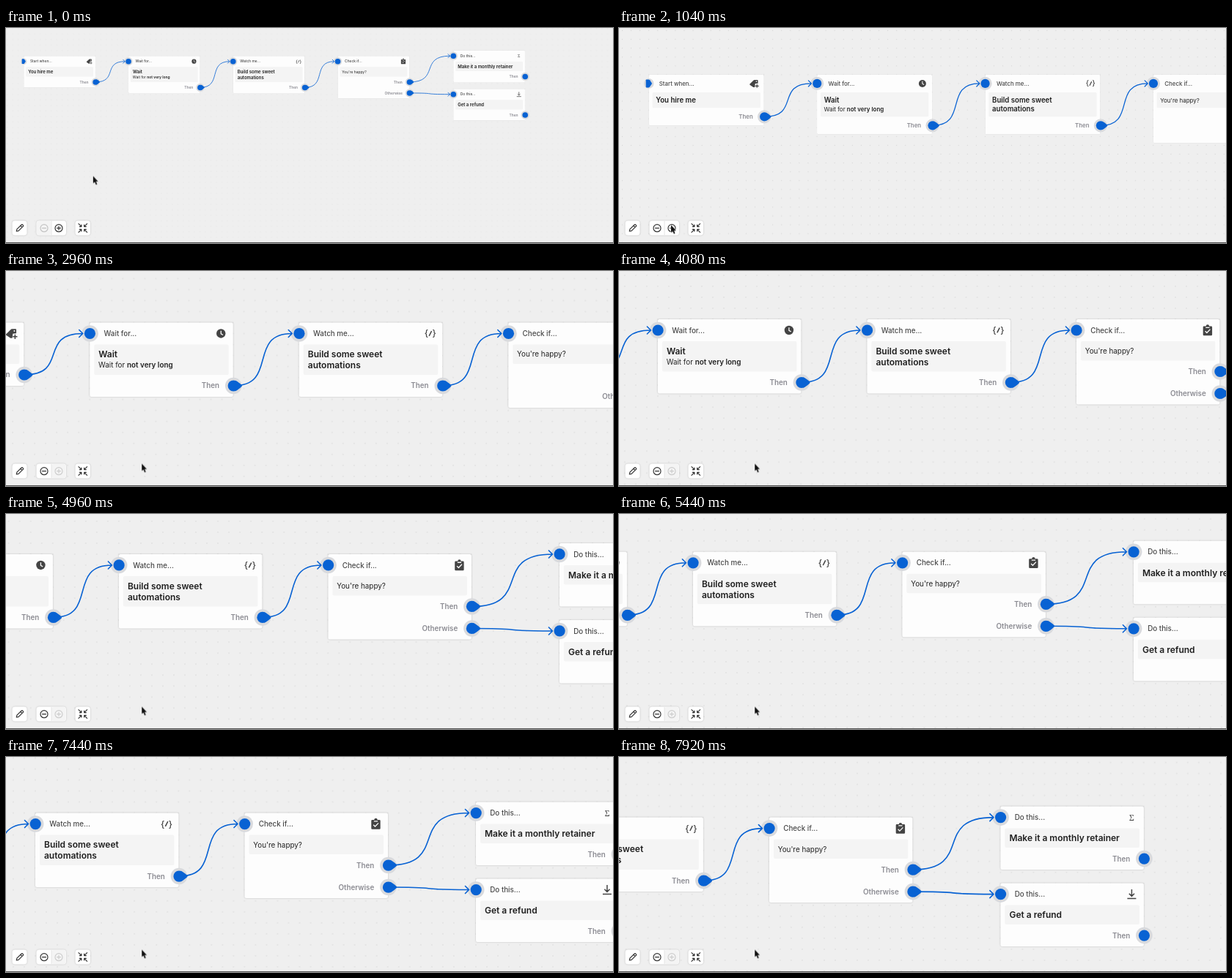
These frames come from a looping animation (828x294 px, 8000 ms). An HTML page:

```html
<!DOCTYPE html>
<html lang="en">
<head>
<meta charset="utf-8">
<title>Automation flow</title>
<style>
  html, body { margin: 0; width: 100%; height: 100%; overflow: hidden; background: #efefef; }
  svg { display: block; width: 828px; height: 294px; font-family: Inter, sans-serif; }

  /* 1% = 80 ms */
  #world { animation: view 8s infinite; }
  #cursor { animation: point 8s infinite; }
  #minus { animation: minus 8s step-end infinite; }
  #plus { animation: plus 8s step-end infinite; }
  #shade { animation: shade 8s step-end infinite; }

  @keyframes view {
    0%, 9% { transform: translate(24.2px, 38.2px) scale(.5); animation-timing-function: cubic-bezier(.35, .1, .4, 1); }
    18%, 25.5% { transform: translate(51.4px, 80.5px) scale(1); }
    26% { transform: translate(51.4px, 80.5px) scale(1); animation-timing-function: cubic-bezier(.33, .3, .67, .78); }
    37% { transform: translate(-171.1px, 70.5px) scale(1); animation-timing-function: cubic-bezier(.33, .67, .67, 1); }
    47.5%, 54% { transform: translate(-232.6px, 66px) scale(1); animation-timing-function: cubic-bezier(.3, .1, .4, .95); }
    68% { transform: translate(-470.1px, 51.8px) scale(1); animation-timing-function: cubic-bezier(.3, 0, .4, 1); }
    76%, 92% { transform: translate(-516.1px, 75.8px) scale(1); animation-timing-function: cubic-bezier(.3, .1, .5, 1); }
    99%, 100% { transform: translate(-651.6px, 82.6px) scale(1); }
  }
  @keyframes point {
    0% { transform: translate(118.8px, 202.4px); animation-timing-function: ease-in-out; }
    8%, 14% { transform: translate(71px, 269.5px); animation-timing-function: ease-in-out; }
    20%, 100% { transform: translate(185.2px, 263.4px); }
  }
  @keyframes minus { 0% { opacity: .25; } 8%, 100% { opacity: 1; } }
  @keyframes plus { 0% { opacity: 1; } 16%, 100% { opacity: .2; } }
  @keyframes shade { 0% { transform: translate(42px, 264px); } 8% { transform: translate(42px, 264px); opacity: 0; } 16%, 100% { transform: translate(62px, 264px); opacity: 1; } }

  .card { fill: #fdfdfd; filter: drop-shadow(0 .8px .8px rgba(0, 0, 0, .2)); }
  .body { fill: #f4f4f4; }
  .head { font-size: 9.8px; font-weight: 500; fill: #484848; }
  .title { font-size: 12px; font-weight: 600; fill: #1f1f1f; }
  .note { font-size: 9.9px; fill: #222; }
  .note tspan { font-weight: 600; }
  .out { font-size: 9.8px; font-weight: 600; fill: #8b8b92; text-anchor: end; }
  .glyph { text-anchor: middle; fill: #444; }
  .ring { fill: #d9dadd; }
  .blue { fill: #0862d3; }
  .edge { fill: none; stroke: #0862d3; stroke-width: 1.6; stroke-linecap: round; stroke-linejoin: round; }
  .dark { fill: #444; }
  .cut { fill: none; stroke: #fdfdfd; stroke-width: 1.3; }
  .line { fill: none; stroke: #444; stroke-width: 1.5; }
  .btn { fill: #fff; filter: drop-shadow(0 .5px 1px rgba(0, 0, 0, .2)); }
  .tool { fill: none; stroke: #333; stroke-width: 1.2; stroke-linecap: round; stroke-linejoin: round; }
</style>
</head>
<body>
<svg viewBox="0 0 828 294">
  <defs>
    <pattern id="dots" x="-7.51" y="-7.51" width="15.025" height="15.025" patternUnits="userSpaceOnUse">
      <circle cx="7.51" cy="7.51" r=".75" fill="#d6d6d6"/>
    </pattern>
  </defs>
  <rect width="828" height="294" fill="#efefef"/>
  <g id="world"></g>

  <g>
    <rect class="btn" x="8.5" y="263.5" width="20" height="20" rx="4"/>
    <path class="tool" d="M14.3 278l.6-2.8 6.2-6.2a1.1 1.1 0 0 1 1.6 0l.6.6a1.1 1.1 0 0 1 0 1.6l-6.2 6.2zM19.8 270.3l2.2 2.2"/>
    <rect class="btn" x="41.5" y="263.5" width="40.5" height="20" rx="4"/>
    <rect id="shade" width="19.5" height="19" rx="3" fill="#f4f4f4"/>
    <path d="M62 264v19" stroke="#e4e4e4"/>
    <g id="minus" class="tool"><circle cx="52" cy="273.7" r="5"/><path d="M49.6 273.7h4.8"/></g>
    <g id="plus" class="tool"><circle cx="72" cy="273.7" r="5"/><path d="M69.6 273.7h4.8M72 271.3v4.8"/></g>
    <rect class="btn" x="94.5" y="263.5" width="20.5" height="20" rx="4"/>
    <g id="fit" class="tool" transform="translate(104.8 273.5)"></g>
  </g>
  <rect y="293" width="828" height="1" fill="#555"/>
  <path id="cursor" d="M0 0v10l2.2-2 1.7 3.9 1.7-.7-1.7-3.8h3z" fill="#111" stroke="#fff" stroke-width=".9" paint-order="stroke"/>
</svg>

<script>
const W = 195.5, PORT_X = 196, IN_Y = 15;

const icons = {
  tag: `<path class="dark" d="M-7.5 .8L-1.2-5.6Q-.6-6.2 .2-6.2H5.3Q6.3-6.2 6.3-5.2V-.3L1.6 .2 .8 6.2H-1.6L-7.5 2.2Q-8 1.5-7.5 .8z"/>
    <circle cx="3.6" cy="-3.5" r="1" fill="#fdfdfd"/><path class="line" d="M4.6 1.2v6.2M1.5 4.3h6.2"/>`,
  clock: `<circle class="dark" r="6.2"/><path class="cut" d="M0-3.8V.3L2.8 2"/>`,
  code: `<g class="glyph" font-size="12" font-weight="500"><text x="-5.4" y="4">{</text><text x="5.4" y="4">}</text></g>
    <path class="line" stroke-width="1.2" d="M-1.6 3.4L1.8-3.4"/>`,
  check: `<path class="dark" d="M-5-5.5H-2.2A2.2 2.2 0 0 1 2.2-5.5H5Q6.2-5.5 6.2-4.3V6Q6.2 7.2 5 7.2H-5Q-6.2 7.2-6.2 6V-4.3Q-6.2-5.5-5-5.5z"/>
    <path class="cut" d="M-3.3 1.2L-1 3.5 3.5-1.2M-2.6-3.7H2.6"/>`,
  sum: `<text class="glyph" y="4" font-size="11" font-family="Noto Serif, serif">Σ</text>`,
  load: `<path class="line" d="M0-6.5V2.6M-3.6-.8L0 2.8 3.6-.8M-6 6H6"/>`
};

const cards = [
  { x: 0, y: 0, head: 'Start when...', icon: 'tag', title: ['You hire me'], outs: ['Then'], start: true },
  { x: 285.5, y: 0, head: 'Wait for...', icon: 'clock', title: ['Wait'],
    note: 'Wait for <tspan>not very long</tspan>', outs: ['Then'], tall: true },
  { x: 571, y: 0, head: 'Watch me...', icon: 'code', title: ['Build some sweet', 'automations'], outs: ['Then'], tall: true },
  { x: 856.5, y: 0, head: 'Check if...', icon: 'check', title: [], note: "You're happy?", outs: ['Then', 'Otherwise'] },
  { x: 1172, y: -15, head: 'Do this...', icon: 'sum', title: ['Make it a monthly retainer'], outs: ['Then'], end: true },
  { x: 1172, y: 90, head: 'Do this...', icon: 'load', title: ['Get a refund'], outs: ['Then'], end: true }
];
// from card, output, to card
const links = [[0, 0, 1], [1, 0, 2], [2, 0, 3], [3, 0, 4], [3, 1, 5]];

const outY = (c, i) => (c.tall ? 86.5 : 71.5) + 30 * i;
const text = (cls, x, y, s) => `<text class="${cls}" x="${x}" y="${y}">${s}</text>`;

function port(x, y, shape, ring = 11.3) {
  return `<g transform="translate(${x} ${y})"><circle class="ring" r="${ring}"/>${shape}</g>`;
}
const disc = '<circle class="blue" r="7.6"/>';
const drop = disc + '<path class="blue" d="M2-7.3Q6-6.2 11.5-.8V.8Q6 6.2 2 7.3z"/>';
const flag = '<path class="blue" d="M-4-6.8H-.5Q.8-6.8 1.6-5.8L5-.8Q5.5 0 5 .8L1.6 5.8Q.8 6.8-.5 6.8H-4Q-5 6.8-5 5.8V-5.8Q-5-6.8-4-6.8z"/>';

function drawCard(c) {
  const height = outY(c, c.outs.length - 1) + 15;
  const noteY = 47 + 15 * c.title.length;
  return `<g transform="translate(${c.x} ${c.y})">
    <rect class="card" width="${W}" height="${height}" rx="2.5"/>
    <rect class="body" x="6" y="30" width="183.5" height="${c.tall ? 41.5 : 26.5}" rx="2"/>
    ${c.start ? port(0, IN_Y, flag, 8.5) : port(0.2, IN_Y, disc)}
    ${text('head', c.start ? 17.5 : 19.3, 18.6, c.head)}
    <g transform="translate(179 ${IN_Y})">${icons[c.icon]}</g>
    ${c.title.map((s, i) => text('title', 12, 47.8 + 15 * i, s)).join('')}
    ${c.note ? text('note', 11.8, noteY, c.note) : ''}
    ${c.outs.map((s, i) => text('out', 176.8, outY(c, i) + 3.5, s) + port(PORT_X, outY(c, i), c.end ? disc : drop)).join('')}
  </g>`;
}

function drawLink([from, i, to]) {
  const a = cards[from], b = cards[to];
  const x1 = a.x + PORT_X, y1 = a.y + outY(a, i);
  const x2 = b.x - 9.5, y2 = b.y + IN_Y, k = (x2 - x1) * .77;
  return `<path class="edge" d="M${x1} ${y1}C${x1 + k} ${y1} ${x2 - k} ${y2} ${x2} ${y2}m-5-5l5 5-5 5"/>`;
}

document.getElementById('world').innerHTML =
  '<rect x="-150" y="-150" width="1950" height="750" fill="url(#dots)"/>' +
  cards.map(drawCard).join('') + links.map(drawLink).join('');

document.getElementById('fit').innerHTML = [0, 90, 180, 270].map(r =>
  `<path transform="rotate(${r})" d="M5.8-5.8L1.9-1.9M1.9-4.5V-1.9H4.5"/>`).join('');
</script>
</body>
</html>
```
